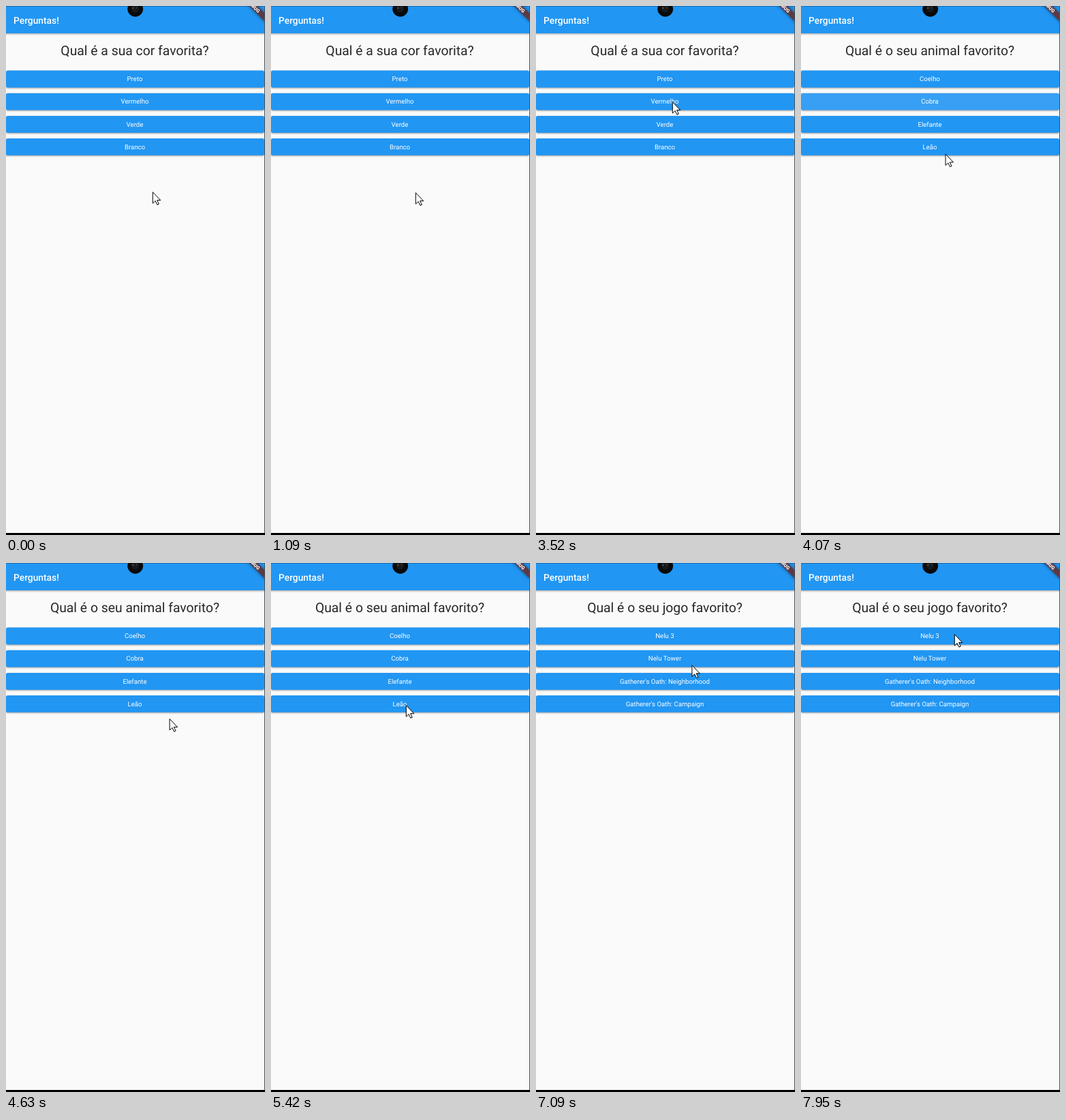
Animation, 380 px wide and 775 px high, one loop 8000 ms. Source, as an HTML page:

```html
<!DOCTYPE html>
<html lang="pt">
<head>
<meta charset="utf-8">
<title>Perguntas!</title>
<style>
  html, body { margin: 0; width: 100%; height: 100%; overflow: hidden; background: #fafafa; }
  svg { display: block; width: 100%; height: 100%; font-family: Roboto, sans-serif; text-rendering: geometricPrecision; }
  .bar { fill: #2196f3; filter: drop-shadow(0 1.5px 1.5px rgba(0, 0, 0, .38)); }
  .button { fill: #2196f3; filter: drop-shadow(0 1.2px 1.1px rgba(0, 0, 0, .38)); }
  .title { font-size: 13.8px; font-weight: 500; fill: #fff; }
  .question { font-size: 19.34px; fill: #272727; text-anchor: middle; }
  .label { font-size: 9.67px; fill: #fff; text-anchor: middle; }
  .banner { fill: #5c3a44; filter: drop-shadow(0 0 2.8px rgba(0, 0, 0, .5)); }
  .debug { font-size: 7px; font-weight: 900; fill: #fff; text-anchor: middle; }
</style>
</head>
<body>
<svg viewBox="0 0 380 775" preserveAspectRatio="none">
  <defs><clipPath id="pressed"><rect id="pressedRect" width="379" height="24.8" rx="2.7"/></clipPath></defs>
  <rect width="380" height="775" fill="#fafafa"/>
  <rect class="bar" x="-5" y="-5" width="390" height="45"/>
  <rect width="380" height="1" fill="#1a6fb5"/>
  <text class="title" x="11" y="25.6">Perguntas!</text>
  <text class="question" id="question" x="189" y="71.8"></text>
  <g id="buttons"></g>
  <circle id="ripple" fill="#fff" clip-path="url(#pressed)"/>
  <g id="labels"></g>
  <g transform="translate(380 -16) rotate(45)">
    <rect class="banner" x="-28" y="19.3" width="56" height="8.3"/>
    <text class="debug" y="26">DEBUG</text>
  </g>
  <circle cx="189.7" cy="4.3" r="11.4" fill="#090a0b"/>
  <circle cx="189.5" cy="4" r="5.5" fill="#17191b"/>
  <circle cx="186.3" cy="3" r="1.1" fill="#63686c"/>
  <circle cx="191.6" cy="2.6" r=".8" fill="#474b50"/>
  <rect x="379" width="1" height="775" fill="#48525a"/>
  <rect y="772" width="380" height="3" fill="#000"/>
  <path id="cursor" d="M0 0V16.5L3.8 12.9L6.6 18.6L9 17.5L6.3 12H11.5Z" fill="#fff" stroke="#000"/>
</svg>
<script>
const LOOP = 8000;
const ROW_TOP = 94.6, ROW_PITCH = 33.15, ROW_HEIGHT = 24.8;
const FADE = 420;

const pages = [
  { at: 0, question: "Qual é a sua cor favorita?",
    answers: ["Preto", "Vermelho", "Verde", "Branco"] },
  { at: 3910, question: "Qual é o seu animal favorito?",
    answers: ["Coelho", "Cobra", "Elefante", "Leão"], tap: { row: 1, x: 200 } },
  { at: 5650, question: "Qual é o seu jogo favorito?",
    answers: ["Nelu 3", "Nelu Tower", "Gatherer's Oath: Neighborhood", "Gatherer's Oath: Campaign"],
    tap: { row: 3, x: 198 } }
];

// Places where the pointer rests or turns
const stops = [
  { at: 0, x: 215, y: 272 },
  { at: 60, x: 215, y: 272 },
  { at: 140, x: 215, y: 298 },
  { at: 340, x: 215, y: 298 },
  { at: 580, x: 126, y: 350 },
  { at: 860, x: 241, y: 350 },
  { at: 1090, x: 212, y: 273 },
  { at: 1200, x: 212, y: 273 },
  { at: 1360, x: 241, y: 310 },
  { at: 1640, x: 148, y: 338 },
  { at: 1870, x: 180, y: 320 },
  { at: 2300, x: 180, y: 320 },
  { at: 2680, x: 150, y: 119 },
  { at: 2930, x: 250, y: 122 },
  { at: 3130, x: 229, y: 140 },
  { at: 3360, x: 201, y: 109 },
  { at: 3520, x: 200, y: 140 },
  { at: 3870, x: 200, y: 140 },
  { at: 4090, x: 212, y: 218 },
  { at: 4260, x: 226, y: 259 },
  { at: 4710, x: 241, y: 225 },
  { at: 4980, x: 213, y: 188 },
  { at: 5180, x: 201, y: 211 },
  { at: 5420, x: 198, y: 208 },
  { at: 5650, x: 198, y: 208 },
  { at: 5950, x: 232, y: 301 },
  { at: 6310, x: 266, y: 193 },
  { at: 6530, x: 274, y: 205 },
  { at: 7320, x: 217, y: 135 },
  { at: 7600, x: 211, y: 104 },
  { at: 7830, x: 211, y: 104 },
  { at: 7950, x: 225, y: 104 }
];

const $ = id => document.getElementById(id);

function set(node, attributes) {
  for (const key in attributes) node.setAttribute(key, attributes[key]);
  return node;
}

function add(parent, name, attributes) {
  const node = document.createElementNS(parent.namespaceURI, name);
  return parent.appendChild(set(node, attributes));
}

const rowY = row => ROW_TOP + row * ROW_PITCH;
const latestIndex = (list, t) => list.findLastIndex(item => item.at <= t);
const smooth = u => u * u * (3 - 2 * u);

const labels = [0, 1, 2, 3].map(row => {
  add($("buttons"), "rect", { class: "button", y: rowY(row), width: 379, height: ROW_HEIGHT, rx: 2.7 });
  return add($("labels"), "text", { class: "label", x: 189, y: rowY(row) + 15.7 });
});

function drawPointer(t) {
  const i = latestIndex(stops, t);
  const from = stops[i], to = stops[i + 1] || from;
  const u = smooth((t - from.at) / (to.at - from.at || Infinity));
  const between = axis => from[axis] + (to[axis] - from[axis]) * u;
  set($("cursor"), { transform: `translate(${between("x") + .3} ${between("y") + .6})` });
}

function drawRipple({ at, tap }, t) {
  const age = t - at;
  const visible = tap && age < FADE;
  set($("ripple"), { opacity: visible ? .16 * (1 - age / FADE) : 0 });
  if (!visible) return;
  set($("pressedRect"), { y: rowY(tap.row) });
  set($("ripple"), { cx: tap.x, cy: rowY(tap.row) + ROW_HEIGHT / 2, r: 90 + 2 * age });
}

let shown;
function draw() {
  const t = performance.now() % LOOP;
  const page = pages[latestIndex(pages, t)];
  if (page !== shown) {
    shown = page;
    $("question").textContent = page.question;
    labels.forEach((label, row) => label.textContent = page.answers[row]);
  }
  drawRipple(page, t);
  drawPointer(t);
  requestAnimationFrame(draw);
}
draw();
</script>
</body>
</html>
```
